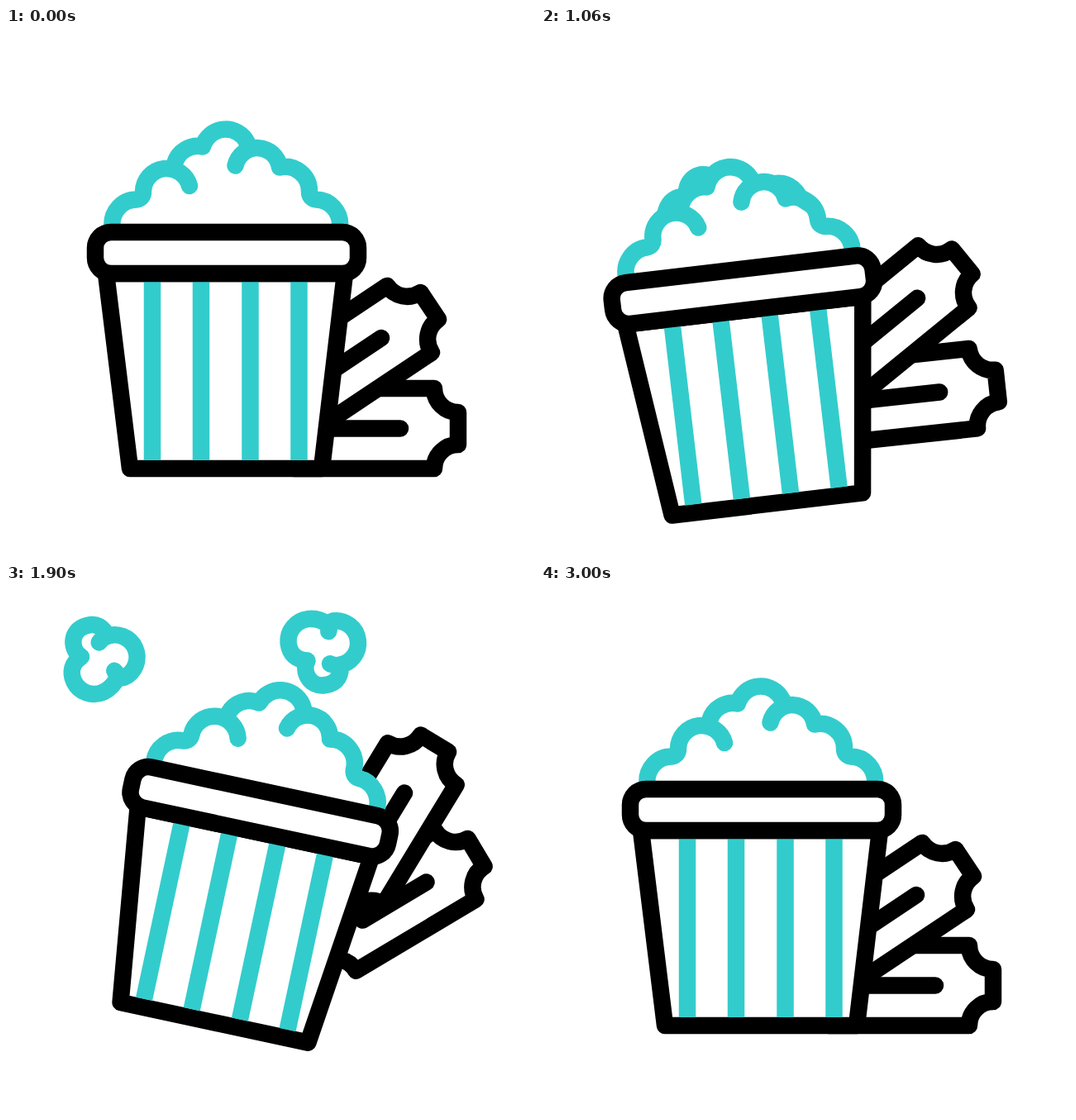
Write an HTML page that moves like this. It is 640 px wide and 640 px high and loops after 3.1 s.

```html
<!DOCTYPE html>
<html lang="en">
<head>
<meta charset="utf-8">
<title>Popcorn and tickets</title>
<style>
  html, body { margin: 0; width: 100%; height: 100%; overflow: hidden; background: #fff; }
  svg { display: block; width: 100vw; height: 100vh; }
  .line { fill: #fff; stroke: #000; stroke-width: 20.5; stroke-linecap: round; stroke-linejoin: round; }
  .teal { stroke: #33cccc; }
  .open { fill: none; }
  .flat { stroke-linecap: butt; }
</style>
</head>
<body>
<svg viewBox="0 0 640 640">
  <defs>
    <g id="kernel" class="line teal open">
      <path d="M-22-10C-30-22-23-42-5-42S17-30 17-20"/>
      <path d="M5-17Q10-20 15-20A27 27 0 0 1 15 34Q11 34 8 22"/>
      <path d="M-22-10Q-42-6-42 14A27 27 0 0 0-15 40Q-2 40 9 30"/>
    </g>
    <!-- The ticket's origin is the right end of its middle line -->
    <path id="ticket" class="line" d="M-128-48.5H41A29 29 0 0 0 70-19.5V19.5A29 29 0 0 0 41 48.5
      H-128A29 29 0 0 0-157 19.5V-19.5A29 29 0 0 0-128-48.5ZM0 0H-90"/>
  </defs>

  <g id="kernelLeft"><use href="#kernel"/></g>
  <g id="kernelRight"><use href="#kernel" transform="scale(1 -1)"/></g>
  <g id="ticketLow"><use href="#ticket"/></g>
  <g id="ticketHigh"><use href="#ticket"/></g>

  <g id="bucket">
    <path fill="#fff" d="M128 242L130 225L166 198L175 178L238 144L266 123L292 140L331 169L367 198L400 225L404 242Z"/>
    <path class="line teal open" d="M128.500 240A29.500 30 0 0 1 158 207.500Q166 206 166 198
      A28.500 28.500 0 0 1 222 191M204 164A29 29 0 0 1 238 143.500A29 29 0 0 1 292 139
      M277.500 166.500A27.200 27.200 0 0 1 331 168.500A29.500 29.500 0 0 1 367 198
      Q367 206 375 207.500A29.500 30 0 0 1 404 240"/>
    <path class="line" d="M121 297L150 533H382L410 297Z"/>
    <path class="line teal flat" d="M177 300V523M236 300V523M295.500 300V523M354.500 300V523"/>
    <rect class="line" x="108" y="247" width="318" height="50" rx="19"/>
  </g>
</svg>
<script>
const LOOP = 3100, END = 3000;

const swing = u => (1 - Math.cos(Math.PI * u)) / 2;
const windUp = u => u ** 1.7;
const burst = u => 1 - (1 - u) ** 2;
const fall = u => u ** 4.5;

// Beats: squat, launch, hang, drift out, land, settle
const beats = [[980, windUp], [1280, burst], [1900, swing], [2160, swing], [2500, swing], [END, burst]];

// A flight begins and ends at rest and meets one pose [x, y, angle] per beat
function flight(rest, ...poses) {
  return [[0, rest], ...beats.map(([time, ease], i) => [time, poses[i] || rest, ease])];
}

const inBucket = (x, angle) => [x, 325, angle];

const flights = {
  ticketLow: flight([477, 484.5, 0], [477, 491, 8.6], [488, 383, -23],
    [508.5, 359.5, -30.8], [534, 372, -28], [499, 501, 3.7]),
  ticketHigh: flight([454, 375, -33.7], [457, 381, -25], [453, 265, -55.5],
    [482, 251.5, -58.7], [500, 265, -55], [458, 404, -24.4]),
  kernelLeft: flight(inBucket(235, 30), inBucket(222, 30), [165, 100, 0],
    [115, 87, -24], [81, 104, -34], [163, 238, -45]),
  kernelRight: flight(inBucket(290, 50), inBucket(285, 50), [297, 131, 28],
    [385, 79, -7], [430, 104, -12], [327, 218, -2])
};

// The bucket shakes harder as it squats, then sways while airborne
const drop = [[0, [0]], [980, [69], windUp], [1280, [14], burst], [1900, [-2], swing],
  [2620, [27], fall], [END, [0], swing]];
const tilt = [[0, [0]], [465, [-2.3], swing], [810, [7.7], swing], [980, [-9.5], swing],
  [1280, [7], swing], [1900, [12.1], swing], [2500, [-5.2], swing], [END, [0], swing]];

function sample(keys, t) {
  const i = keys.findIndex(([time]) => time > t);
  const [from, a] = keys[i - 1];
  const [to, b, ease] = keys[i];
  const k = ease((t - from) / (to - from));
  return a.map((value, n) => value + (b[n] - value) * k);
}

function place(id, transform) {
  document.getElementById(id).setAttribute("transform", transform);
}

function draw(now) {
  const t = Math.min(now % LOOP, END - 0.01);
  place("bucket", `translate(0 ${sample(drop, t)}) rotate(${sample(tilt, t)} 267 466)`);
  for (const id in flights) {
    const [x, y, angle] = sample(flights[id], t);
    place(id, `translate(${x} ${y}) rotate(${angle})`);
  }
}

const start = performance.now();
function tick() {
  draw(performance.now() - start);
  requestAnimationFrame(tick);
}
tick();
</script>
</body>
</html>
```
